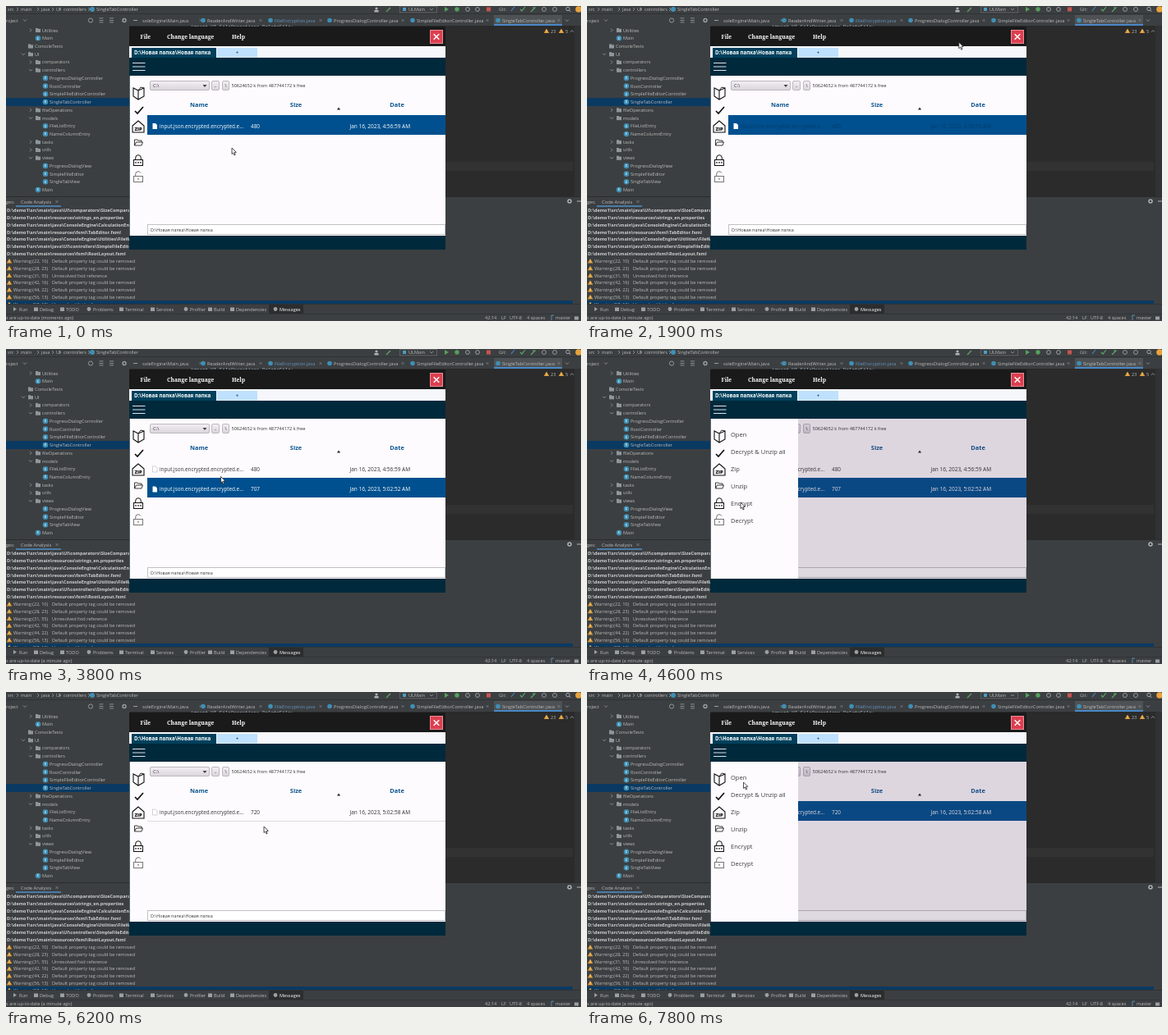
An HTML page with a canvas for the animation above (8000 ms loop, 700 px wide and 384 px high).

```html
<!DOCTYPE html>
<html lang="en">
<head>
<meta charset="utf-8">
<title>File manager demo</title>
<style>
html, body { margin: 0; width: 100%; height: 100%; overflow: hidden; background: #2b2b2b; }
canvas { display: block; width: 700px; height: 384px; }
</style>
</head>
<body>
<canvas id="stage" width="700" height="384"></canvas>
<script>
const ctx = document.getElementById('stage').getContext('2d');
const LOOP = 8000, STEP = 100;
const SANS = '"Open Sans", "Noto Sans", sans-serif';
const SERIF = '"Noto Serif", serif';
const PATH = 'D:\\Новая папка\\Новая папка';
const TEAL = '#00293b', BLUE = '#00508f', PANEL = '#3c3f41', INK = '#bbbbbb', PICKED = '#0a3a62';

function rect(x, y, w, h, fill, stroke) {
  if (fill) { ctx.fillStyle = fill; ctx.fillRect(x, y, w, h); }
  if (stroke) { ctx.strokeStyle = stroke; ctx.lineWidth = 1; ctx.strokeRect(x + .5, y + .5, w - 1, h - 1); }
}
function text(s, x, y, color = INK, size = 5.6, weight = 400, align = 'left', family = SANS) {
  ctx.font = `${weight} ${size}px ${family}`;
  ctx.fillStyle = color;
  ctx.textAlign = align;
  ctx.textBaseline = 'alphabetic';
  ctx.fillText(s, x, y + size * .36);
}
function line(points, color, width = 1, close = false, fill) {
  ctx.beginPath();
  points.forEach(([x, y]) => ctx.lineTo(x, y));
  if (close) ctx.closePath();
  if (fill) { ctx.fillStyle = fill; ctx.fill(); }
  if (color) { ctx.strokeStyle = color; ctx.lineWidth = width; ctx.stroke(); }
}
function circle(x, y, r, fill, stroke, width = 1) {
  ctx.beginPath();
  ctx.arc(x, y, r, 0, Math.PI * 2);
  if (fill) { ctx.fillStyle = fill; ctx.fill(); }
  if (stroke) { ctx.strokeStyle = stroke; ctx.lineWidth = width; ctx.stroke(); }
}
function cross(x, y, r, color, width = 1) {
  line([[x - r, y - r], [x + r, y + r]], color, width);
  line([[x + r, y - r], [x - r, y + r]], color, width);
}
function warning(x, y, r) {
  line([[x, y - r], [x + r * 1.1, y + r * .85], [x - r * 1.1, y + r * .85]], null, 0, true, '#dc9a35');
  rect(x - r * .1, y - r * .4, r * .2, r * .7, '#fff3d0');
  rect(x - r * .1, y + r * .48, r * .2, r * .18, '#fff3d0');
}
function clipped(x, y, w, h, draw) {
  ctx.save();
  ctx.beginPath();
  ctx.rect(x, y, w, h);
  ctx.clip();
  draw();
  ctx.restore();
}
function chevron(x, y, open) {
  line(open ? [[x - 2, y - 1], [x, y + 1], [x + 2, y - 1]] : [[x - 1, y - 2], [x + 1, y], [x - 1, y + 2]], '#9da0a2', .8);
}

// Depth 0-2; kind: 'f' closed folder, 'o' open folder, 'n' plain folder, 'c' class
const TREE = [
  [1, 'f', 'Utilities'], [1, 'c', 'Main'], [0, 'n', 'ConsoleTests'], [0, 'o', 'UI'],
  [1, 'f', 'comparators'], [1, 'o', 'controllers'], [2, 'c', 'ProgressDialogController'],
  [2, 'c', 'RootController'], [2, 'c', 'SimpleFileEditorController'], [2, 'c', 'SingleTabController'],
  [1, 'f', 'fileOperations'], [1, 'o', 'models'], [2, 'c', 'FileListEntry'], [2, 'c', 'NameColumnEntry'],
  [1, 'f', 'tasks'], [1, 'f', 'utils'], [1, 'o', 'views'], [2, 'c', 'ProgressDialogView'],
  [2, 'c', 'SimpleFileEditor'], [2, 'c', 'SingleTabView'], [1, 'c', 'Main']
];
function drawTree() {
  rect(0, 24, 151, 208, PANEL);
  TREE.forEach(([depth, kind, name], i) => {
    const y = 29.5 + i * 9.73, x = 35 + depth * 9;
    if (name === 'SingleTabController') rect(0, 112, 151, 10, PICKED);
    if (kind === 'c') {
      circle(x - 5, y, 3.3, '#3f8fb5');
      text('c', x - 5, y - .3, '#d7edf5', 4.6, 700, 'center');
    } else {
      if (kind !== 'n') chevron(x - 14, y, kind === 'o');
      rect(x - 8, y - 2.5, 3, 2, '#8e979e');
      rect(x - 8, y - 1.6, 6, 4.2, '#8e979e');
    }
    text(name, x, y);
  });
}

const MESSAGES = [
  'java\\UI\\comparators\\SizeComparator.java', 'resources\\strings_en.properties',
  'java\\ConsoleEngine\\CalculationEngine.java', 'resources\\fxml\\TabEditor.fxml',
  'java\\ConsoleEngine\\Utilities\\FileWriter.java', 'java\\UI\\controllers\\SimpleFileEditor.java',
  'resources\\fxml\\RootLayout.fxml'
];
const WARNINGS = ['22, 10', '28, 23', '31, 55', '42, 16', '44, 22', '56, 13', '57, 13'];
function drawMessages() {
  rect(0, 232, 700, 131, PANEL);
  rect(0, 232, 700, 1, '#2a2c2d');
  text('ges:', 0, 238.5);
  text('Code Analysis', 18, 238.5, INK, 5.8);
  cross(62, 238.5, 1.5, '#8b8d8f', .7);
  rect(12, 243, 55, 2, '#4a7ba6');
  circle(686, 238, 2, null, '#afb1b3', 1.5);
  rect(695, 237.5, 5, 1, '#afb1b3');
  clipped(0, 245, 690, 118, () => {
    rect(0, 359, 690, 4, PICKED);
    MESSAGES.forEach((s, i) => text('D:\\demo1\\src\\main\\' + s, 1, 249.5 + i * 8.75, '#d0d0d0', 5.5, 700));
    WARNINGS.forEach((s, i) => {
      const y = 311 + i * 8.75;
      warning(4, y, 3);
      text(`Warning:(${s})`, 9, y);
      text(/55|57/.test(s) ? 'Unresolved fxid reference' : 'Default property tag could be removed', 56, y);
    });
  });
}

const TABS = [['soleEngine\\Main.java', 166], ['ReaderAndWriter.java', 245], ['FileEncryption.java', 327],
  ['ProgressDialogController.java', 399], ['SimpleFileEditorController.java', 500], ['SingleTabController.java', 604]];
const CRUMBS = [['src', 2], ['main', 18], ['java', 43], ['UI', 61], ['controllers', 70], ['SingleTabController', 110]];
const TOOLS = [['Run', 16], ['Debug', 41], ['TODO', 73], ['Problems', 106], ['Terminal', 145], ['Services', 183],
  ['Profiler', 224], ['Build', 253], ['Dependencies', 280], ['Messages', 333]];

function drawTopBars() {
  rect(0, 0, 700, 24, PANEL);
  rect(0, 9, 700, 1, '#2f3234');
  CRUMBS.forEach(([s, x], i) => {
    text(s, x, 4);
    if (i) chevron(x - (i === 5 ? 9 : 4), 4, false);
  });
  circle(105, 4, 3, '#3f8fb5');
  circle(451, 3, 1.6, '#afb1b3');
  rect(448.5, 5, 5, 2.5, '#afb1b3');
  line([[463, 7], [468, 2]], '#5d9b62', 1.5);
  rect(479, 0, 46, 8.5, null, '#5e6163');
  rect(483, 2, 4, 4, '#4a9cc2');
  text('ULMain', 490, 4);
  chevron(518, 4, true);
  line([[534, 1], [539, 4], [534, 7]], null, 0, true, '#55a05c');
  circle(549, 4, 2.7, '#55a05c');
  circle(562, 4, 2.4, null, '#9da0a2');
  circle(574, 4, 2.4, null, '#9da0a2');
  rect(585, 1.5, 5, 5, '#c75450');
  text('Git:', 600, 4);
  line([[619, 1], [615, 6]], '#4a88c7', 1.2);
  line([[626, 4], [628, 6], [632, 1]], '#59a869', 1.2);
  line([[639, 7], [644, 2], [641, 2]], '#59a869', 1.2);
  [655, 668].forEach(x => circle(x, 4, 2.5, null, '#9da0a2', .9));
  circle(684, 3.5, 2.2, null, '#afb1b3', .9);
  line([[685.5, 5], [687.5, 7]], '#afb1b3', .9);
  circle(697, 4, 3.8, '#e9a23b');

  text('roject', 0, 17.5);
  chevron(23, 17.5, true);
  circle(103, 17.5, 2.6, null, '#9da0a2', .9);
  [113.5, 126].forEach(x => [-2.5, 0, 2.5].forEach(d => rect(x, 17 + d, 5, .8, '#9da0a2')));
  circle(144, 17.5, 2, null, '#9da0a2', 1.4);
  rect(155, 17, 5, 1, '#9da0a2');

  rect(594, 11, 83, 13, '#4e5254');
  rect(594, 22, 83, 2, '#4a88c7');
  TABS.forEach(([s, x], i) => {
    if (i) circle(x - 5, 17.5, 2.8, '#3f8fb5');
    text(s, x, 17.5, i === 2 ? '#6494c4' : INK, 5.7);
    cross([237, 310, 383, 483, 586, 673][i], 17.5, 1.4, '#85888a', .7);
  });
  chevron(683, 17.5, true);
}

function drawIde(t) {
  rect(0, 0, 700, 384, '#2b2b2b');
  drawTopBars();
  text('import UI.FileOperations.DeleteFile;', 225, 24.5, '#a9b7c6', 5.8, 400, 'left', '"Noto Sans Mono", monospace');
  rect(535, 190, 155, 11, '#323232');
  rect(692, 24, 8, 208, '#303234');
  warning(658, 30.5, 3);
  text('23', 663, 30.5);
  warning(676, 30.5, 3);
  text('5', 681, 30.5);
  line([[687, 32], [689, 29.5], [691, 32]], '#9da0a2', .7);
  drawTree();
  drawMessages();

  rect(0, 363, 700, 21, PANEL);
  rect(0, 363, 700, 1, '#2f3234');
  rect(320, 364, 42, 11, '#2b2d2e');
  TOOLS.forEach(([s, x], i) => {
    if (!i) line([[x - 7, 367], [x - 3, 369.5], [x - 7, 372]], null, 0, true, '#9da0a2');
    else if (i % 3) rect(x - 7, 367.5, 5, 4.5, '#9da0a2');
    else circle(x - 5, 369.5, 2.4, '#9da0a2');
    text(s, x, 369.5, i === 9 ? '#fff' : INK);
  });
  rect(0, 375, 700, 1, '#323537');
  text(`s are up-to-date (${t < 1500 ? 'moments' : 'a minute'} ago)`, 0, 379.8);
  [['42:14', 583], ['LF', 603], ['UTF-8', 613], ['4 spaces', 634], ['master', 669]].forEach(([s, x]) => text(s, x, 379.8));
  line([[664, 383], [664, 377], [667, 377]], '#5d9fcb', .8);
  rect(692, 378.5, 5, 4, '#9da0a2');
}

const MENU = ['Open', 'Decrypt & Unzip all', 'Zip', 'Unzip', 'Encrypt', 'Decrypt'];
function padlock(y, open) {
  const color = open ? '#777' : '#111';
  ctx.beginPath();
  ctx.arc(161, y - 4, 3.3, Math.PI, open ? Math.PI * 1.85 : 0);
  ctx.strokeStyle = color;
  ctx.lineWidth = 1;
  ctx.stroke();
  line([[157.7, y - 4], [157.7, y - 1]], color);
  if (!open) line([[164.3, y - 4], [164.3, y - 1]], color);
  rect(155, y - 2, 12, 8, null, color);
  for (const x of open ? [161] : [158, 161, 164]) rect(x - .7, y + 1, 1.4, 1.6, color);
}
function drawIcons() {
  const k = '#111';
  line([[161, 103], [155, 100], [155, 110], [161, 114], [168, 110], [168, 100], [161, 103], [161, 114]], k, 1.1);
  line([[161, 103], [164, 99], [168, 100]], k, .9);
  line([[157, 128], [160, 131], [167, 123]], k, 1.7);
  line([[154, 146], [161, 140], [168, 146], [168, 154], [154, 154]], k, 1.1, true);
  text('ZIP', 161, 149.5, k, 5.8, 800, 'center');
  line([[156.5, 170], [156.5, 163], [160, 163], [161, 164], [165, 164], [165, 166]], k, .8);
  line([[156.5, 170], [158.5, 166], [166.5, 166], [165, 170]], k, .8, true);
  padlock(189, false);
  padlock(209, true);
}

function rowsAt(t) {
  const row = (size, time) => ({ size, time });
  const a = row(480, '4:56:59'), b = row(707, '5:02:52'), c = row(720, '5:02:58');
  if (t < 3300) return { rows: [a], sel: 0 };
  if (t < 5000) return { rows: [a, b], sel: t < 3700 ? 0 : 1 };
  if (t < 5800) return { rows: [a, b, c], sel: 1 };
  if (t < 6200) return { rows: [a, c], sel: t < 5900 ? -1 : 0 };
  return { rows: [c], sel: t < 6500 ? -1 : 0 };
}
const within = (t, spans) => spans.find(([a, b]) => t >= a && t < b);

function drawTable(t) {
  const { rows, sel } = rowsAt(t);
  const unfocused = within(t, [[700, 3000], [5400, 5800], [6000, 6200]]);
  [['Name', 235], ['Size', 353], ['Date', 476]].forEach(([s, x]) => text(s, x, 120, '#0b5490', 7.4, 700, 'center'));
  line([[403, 126.5], [405, 123.5], [407, 126.5]], null, 0, true, '#222');
  rows.forEach((r, i) => {
    const top = Math.round(132.6 + i * 24.3), y = 146.5 + i * 24.4, on = i === sel;
    if (on) rect(172, top, 363, 24, BLUE);
    else rect(172, top + 24, 363, .7, '#cfcfd4');
    const ink = !on ? '#333' : unfocused ? '#003c6c' : '#fff';
    line([[178.5, y - 3.5], [182, y - 3.5], [184, y - 1.5], [184, y + 3.5], [178.5, y + 3.5]],
      on ? null : '#b5b5ba', .6, true, on && i && unfocused ? '#9c4356' : '#fff');
    text('input.json.encrypted.encrypted.e...', 187, y, ink, 6.3);
    text(r.size, 298, y, ink, 6.4);
    text(`Jan 16, 2023, ${r.time} AM`, 418.5, y, ink, 6.5);
  });
}

function drawMenu(t) {
  const span = within(t, [[400, 800], [2500, 3100], [4100, 4800], [7400, 8000]]);
  if (!span) return;
  const p = Math.min(1, (t - span[0]) / 200);
  if (!p) return;
  rect(151, 85, 384, 195, `rgba(60,30,70,${.17 * p})`);
  clipped(151, 85, 106 * p, 195, () => {
    rect(151, 85, 106, 195, '#fdfbfd');
    if (t >= 2700 && t < 3000) {
      const g = ctx.createLinearGradient(172, 0, 226, 0);
      g.addColorStop(0, '#b9b5ba');
      g.addColorStop(1, '#8f8c90');
      line([[172, 138], [224, 138], [226, 156], [172, 156]], null, 0, true, g);
    }
    drawIcons();
    MENU.forEach((s, i) => text(s, 175, 104.5 + i * 21, '#3a3a40', 7.5));
  });
}

function button(x, y, w, h, label, focus) {
  const g = ctx.createLinearGradient(0, y, 0, y + h);
  g.addColorStop(0, '#f4f0f5');
  g.addColorStop(1, '#d9d3da');
  ctx.beginPath();
  ctx.roundRect(x + .5, y + .5, w - 1, h - 1, 1.5);
  ctx.fillStyle = g;
  ctx.fill();
  ctx.lineWidth = focus ? 1.3 : 1;
  ctx.strokeStyle = focus ? '#2f9fc9' : '#bdb8bf';
  ctx.stroke();
  text(label, x + w / 2, y + h / 2, '#333', 5.7, 400, 'center');
}

function drawWindow(t) {
  rect(150, 25, 385, 272, '#fdfbfd');
  rect(150, 25, 385, 24, '#1a1a1b');
  [['File', 163.5], ['Change language', 196], ['Help', 275]].forEach(([s, x]) => text(s, x, 37.3, '#fff', 6.7, 700, 'left', SERIF));
  rect(516, 29, 16, 17, '#dc3f50', '#ee8d96');
  cross(524, 37.5, 3.3, '#fff', 1.5);
  rect(150, 49, 385, 14, '#f5f7fb');
  rect(153, 51, 103, 12, '#00405c');
  text(PATH, 156, 57, '#fff', 6.2, 700);
  rect(257, 51, 49, 11.5, '#bfe1fd');
  text('+', 281.5, 56.8, '#164f80', 6, 700, 'center');
  rect(150, 63, 385, 22, TEAL);
  [69, 73.5, 78].forEach(y => rect(154, y, 15.5, 1, '#d9e4ea'));
  rect(150, 280, 385, 17, TEAL);
  drawIcons();
  button(175, 91, 73, 12, '', false);
  text('C:\\', 179, 97, '#333', 5.8);
  line([[239.5, 96], [244.5, 96], [242, 99]], null, 0, true, '#444');
  button(250, 91, 10, 12, '..', false);
  button(263, 91, 9, 12, '\\', false);
  text('50624652 k from 487744172 k free', 274.5, 97, '#333', 5.55);
  drawTable(t);
  rect(172, 266, 363, 13, '#fff', '#c3c1c6');
  text(PATH, 176, 273, '#333', 5.4);
  drawMenu(t);
  rect(150, 85, 1, 195, '#56666f');
}

function drawEditorGhost() {
  rect(199, 37, 288, 26, 'rgba(75,75,80,.45)');
  rect(199, 63, 288, 9, 'rgba(140,140,150,.15)');
  rect(199, 72, 288, 12, 'rgba(140,140,150,.4)');
  cross(478, 43, 2, '#555', .9);
  text('Enter the text and save', 205, 78.5, '#10202a', 5.7);
  rect(199, 84, 288, 193, 'rgba(235,215,240,.2)', 'rgba(190,160,200,.3)');
  rect(202, 84, 283, 178, null, 'rgba(190,160,200,.3)');
  text('I want to save file', 205, 269.5, 'rgba(130,110,140,.45)', 5.7);
}
function drawEditor(t) {
  if (t < 900 || t >= 1900) return;
  if (t < 1000 || t >= 1800) return drawEditorGhost();
  rect(199, 37, 288, 240, '#f1edf3', '#a59dab');
  rect(199, 37, 288, 13, '#fff');
  rect(203, 40, 6, 6, '#7e9bb5');
  cross(478, 43, 2.3, '#333', .9);
  rect(202, 72, 283, 11, '#d8d2dc', '#aaa3af');
  text('Enter the text and save', 205, 78, '#222', 5.7);
  rect(202, 84, 283, 178, '#fff', '#b98fc1');
  text('I want to save file', 205, 269.5, '#333', 5.7);
}

function drawConfirm(t) {
  if (!within(t, [[5500, 5800], [6000, 6200]])) return;
  rect(256, 89, 177, 87, 'rgba(0,0,0,.22)');
  rect(255, 87, 176, 87, '#f3ebf4', '#8c8a90');
  rect(256, 88, 174, 13, '#fff');
  rect(259, 91, 6, 6.5, '#fff', '#8797a5');
  rect(260, 92, 2, 4, '#457ba5');
  text('Warning', 268, 94.3, '#222', 5.8);
  cross(422, 94, 2, '#333', .8);
  rect(256, 134, 174, 1, '#cdc6cf');
  text('Confirm delete operation', 260, 118.3, '#333', 6.2);
  warning(413, 119.5, 9);
  text('Selected files will be deleted. Do you want to continue?', 260, 146.7, '#333', 5.5);
  button(304, 156, 36, 13, 'Yes', true);
  button(389, 156, 36, 13, 'No', false);
}

const CURSOR = [[0, 275, 173], [400, 162, 72], [500, 162, 72], [700, 190, 104], [800, 207, 101], [1000, 207, 101],
  [1600, 476, 42], [1800, 476, 42], [2400, 162, 72], [2500, 162, 72], [2700, 192, 150], [3000, 192, 150],
  [3500, 280, 171], [3700, 280, 171], [4100, 162, 72], [4200, 162, 72], [4500, 187, 187], [4700, 187, 187],
  [5200, 300, 170], [5500, 314, 164], [6200, 314, 164], [6800, 326, 139], [7100, 326, 145], [7200, 329, 147],
  [7400, 329, 147], [7500, 162, 72], [7600, 164, 76], [7800, 190.5, 110]];
function drawCursor(t) {
  const i = CURSOR.findIndex(k => k[0] > t);
  const b = CURSOR[i < 0 ? CURSOR.length - 1 : i], a = i < 0 ? b : CURSOR[i - 1];
  const u = a === b ? 0 : (t - a[0]) / (b[0] - a[0]), e = u * u * (3 - 2 * u);
  const x = a[1] + (b[1] - a[1]) * e, y = a[2] + (b[2] - a[2]) * e;
  const overText = t >= 900 && t < 1400;
  if (overText) {
    rect(x + 2, y, 1, 8, '#222');
    [0, 8].forEach(d => rect(x + .5, y + d, 4, .8, '#222'));
    return;
  }
  const arrow = [[0, 0], [0, 7.5], [1.7, 6], [3, 9], [4.2, 8.4], [3, 5.5], [5.3, 5.3]];
  line(arrow.map(([dx, dy]) => [x + dx, y + dy]), '#222', .8, true, '#fff');
}

let start;
function tick(now) {
  start ??= now;
  const t = Math.floor(((now - start) % LOOP) / STEP) * STEP;
  drawIde(t);
  drawWindow(t);
  drawEditor(t);
  drawConfirm(t);
  drawCursor(t);
  requestAnimationFrame(tick);
}
requestAnimationFrame(tick);
</script>
</body>
</html>
```
